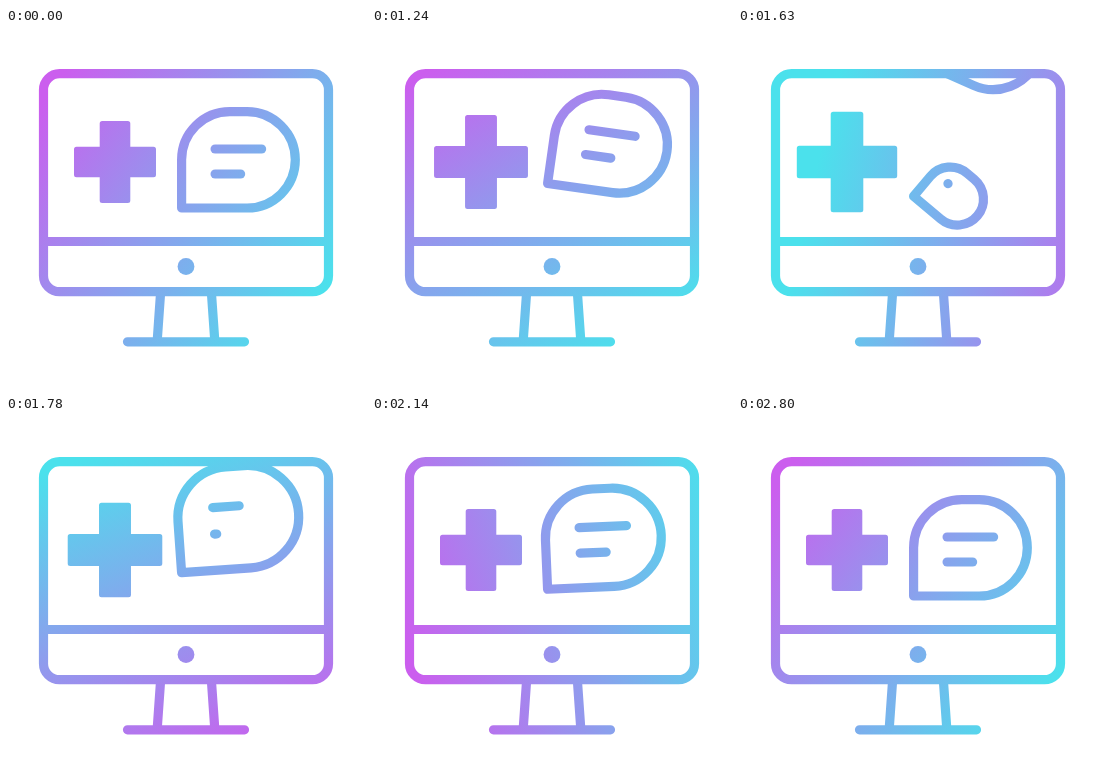
Write an HTML page that moves like this. It is 360 by 360 pixels and loops after 2.83 s.

```html
<!DOCTYPE html>
<html lang="en">
<head>
<meta charset="utf-8">
<title>Online consultation icon</title>
<style>
  html, body { margin: 0; width: 100%; height: 100%; overflow: hidden; background: #fff; }
  svg { display: block; width: 100vw; height: 100vh; }
  .ink { stroke: url(#tint); stroke-width: 9.2; stroke-linecap: round; stroke-linejoin: round; fill: none; }
  .solid { fill: url(#tint); }
</style>
</head>
<body>
<svg viewBox="0 0 360 360">
  <defs>
    <linearGradient id="tint" gradientUnits="userSpaceOnUse">
      <stop offset="0" stop-color="#cb5eee"/>
      <stop offset="1" stop-color="#4be1ec"/>
    </linearGradient>
    <clipPath id="screen"><rect x="42" y="46" width="276" height="168"/></clipPath>
  </defs>
  <g clip-path="url(#screen)"><g id="leaving" class="ink"></g></g>
  <g class="ink">
    <rect x="37.5" y="45.7" width="285" height="218" rx="16"/>
    <path d="M40 213.5H320M154.5 266L151.2 313M205.5 266L208.8 313M121.5 313.8H238.5"/>
  </g>
  <circle class="solid" cx="180" cy="238.5" r="8.4"/>
  <path id="cross" class="solid" stroke="url(#tint)" stroke-width="5" stroke-linejoin="round"/>
  <g id="arriving" class="ink"></g>
</svg>
<script>
const LOOP = 2830, HOLD = 1030, STEP = 30, START = 1000;
const TIP_X = 175.6;
const $ = id => document.getElementById(id);
const clamp = v => Math.min(1, Math.max(0, v));
const span = (t, a, b) => clamp((t - a) / (b - a));
const smooth = u => u * u * (3 - 2 * u);

// Hermite curve through [time, value] keys, flat at the extremes
function curve(keys) {
  const rate = i => (keys[i + 1][1] - keys[i][1]) / (keys[i + 1][0] - keys[i][0]);
  const slopes = keys.map((k, i) => {
    if (i === keys.length - 1) return 0;
    if (i === 0) return rate(0);
    const a = rate(i - 1), b = rate(i);
    return a * b <= 0 ? 0 : 2 * a * b / (a + b);
  });
  return t => {
    if (t <= keys[0][0]) return keys[0][1];
    const i = keys.findIndex(k => k[0] > t) - 1;
    if (i < 0) return keys[keys.length - 1][1];
    const [t0, v0] = keys[i], [t1, v1] = keys[i + 1];
    const h = t1 - t0, u = (t - t0) / h, e = smooth(u);
    return v0 + (v1 - v0) * e
      + h * u * (1 - u) * ((1 - u) * slopes[i] - u * slopes[i + 1]);
  };
}

const popScale = curve([[1510, 0], [1630, .54], [1870, 1.2], [1960, 1.14], [2110, 1.03], [2230, 1]]);
const popTurn = curve([[1510, 52], [1630, 40], [1870, -20], [1960, -16], [2110, -4], [2330, 4], [2620, 0]]);
const popY = curve([[1510, 174], [1630, 168.3], [1870, 153], [1960, 156], [2110, 171], [2330, 183.5], [2620, 180]]);

function makeBubble(group) {
  const paths = [0, 1, 2].map(() =>
    group.appendChild(document.createElementNS('http://www.w3.org/2000/svg', 'path')));
  paths[0].setAttribute('fill', '#fff');
  // Local coordinates have their origin at the tip.
  return (y, degrees, scale, first, second) => {
    const c = Math.cos(degrees * Math.PI / 180) * scale;
    const s = Math.sin(degrees * Math.PI / 180) * scale;
    const at = (px, py) =>
      `${(TIP_X + px * c - py * s).toFixed(2)} ${(y + px * s + py * c).toFixed(2)}`;
    const arc = r => `A${r * scale} ${r * scale} 0 0 1 `;
    group.style.display = scale > 0 ? '' : 'none';
    paths[0].setAttribute('d', `M${at(0, 0)}L${at(0, -48.2)}${arc(48.2)}${at(48.2, -96.4)}`
      + `L${at(65.5, -96.4)}${arc(48.2)}${at(113.7, -48.2)}${arc(48.2)}${at(65.5, 0)}Z`);
    const line = (path, py, length, grown) => {
      path.style.display = grown > 0 ? '' : 'none';
      path.setAttribute('d', `M${at(33.5, py)}L${at(33.5 + Math.max(.01, length * grown), py)}`);
    };
    line(paths[1], -59, 46.5, first);
    line(paths[2], -34, 25.5, second);
  };
}

const drawLeaving = makeBubble($('leaving'));
const drawArriving = makeBubble($('arriving'));

// Timing of cubic-bezier(1/3, 0, 1/3, 1)
function easeTurn(x) {
  let lo = 0, hi = 1;
  for (let i = 0; i < 24; i++) {
    const m = (lo + hi) / 2;
    if (m - m * m + m * m * m < x) lo = m; else hi = m;
  }
  return smooth(lo);
}

function drawTint(t) {
  const p = easeTurn(span(t, START, LOOP));
  const angle = (36 + 360 * p) * Math.PI / 180;
  const cx = 180 + 70 * Math.sin(Math.PI * p) ** 2, cy = 165;
  const dx = 170 * Math.cos(angle), dy = 170 * Math.sin(angle);
  const ends = { x1: cx - dx, y1: cy - dy, x2: cx + dx, y2: cy + dy };
  for (const key in ends) $('tint').setAttribute(key, ends[key].toFixed(2));
}

function drawCross(t) {
  const grow = smooth(span(t, START, 1400)) - smooth(span(t, 1630, 2030));
  const inset = 2.5;
  const r = 41 + 9.2 * grow - inset, a = 15.3 + grow - inset;
  $('cross').setAttribute('d', `M${109 - a} ${134 - r}h${2 * a}v${r - a}h${r - a}v${2 * a}`
    + `h${a - r}v${r - a}h${-2 * a}v${a - r}h${a - r}v${-2 * a}h${r - a}Z`);
}

function draw(time) {
  const now = time % LOOP;
  const t = now < HOLD ? 0 : HOLD + Math.floor((now - HOLD) / STEP) * STEP;
  drawTint(t);
  drawCross(t);
  const rise = 62 * (Math.max(0, t - HOLD) / 360) ** 1.72;
  drawLeaving(180 - rise, 24 * smooth(span(t, HOLD, 1570)), t < 1900 ? 1 : 0, 1, 1);
  drawArriving(popY(t), popTurn(t), popScale(t),
    smooth(span(t, 1615, 1930)), smooth(span(t, 1720, 2070)));
}

const began = performance.now();
function tick() {
  draw(performance.now() - began);
  requestAnimationFrame(tick);
}
tick();
</script>
</body>
</html>
```
